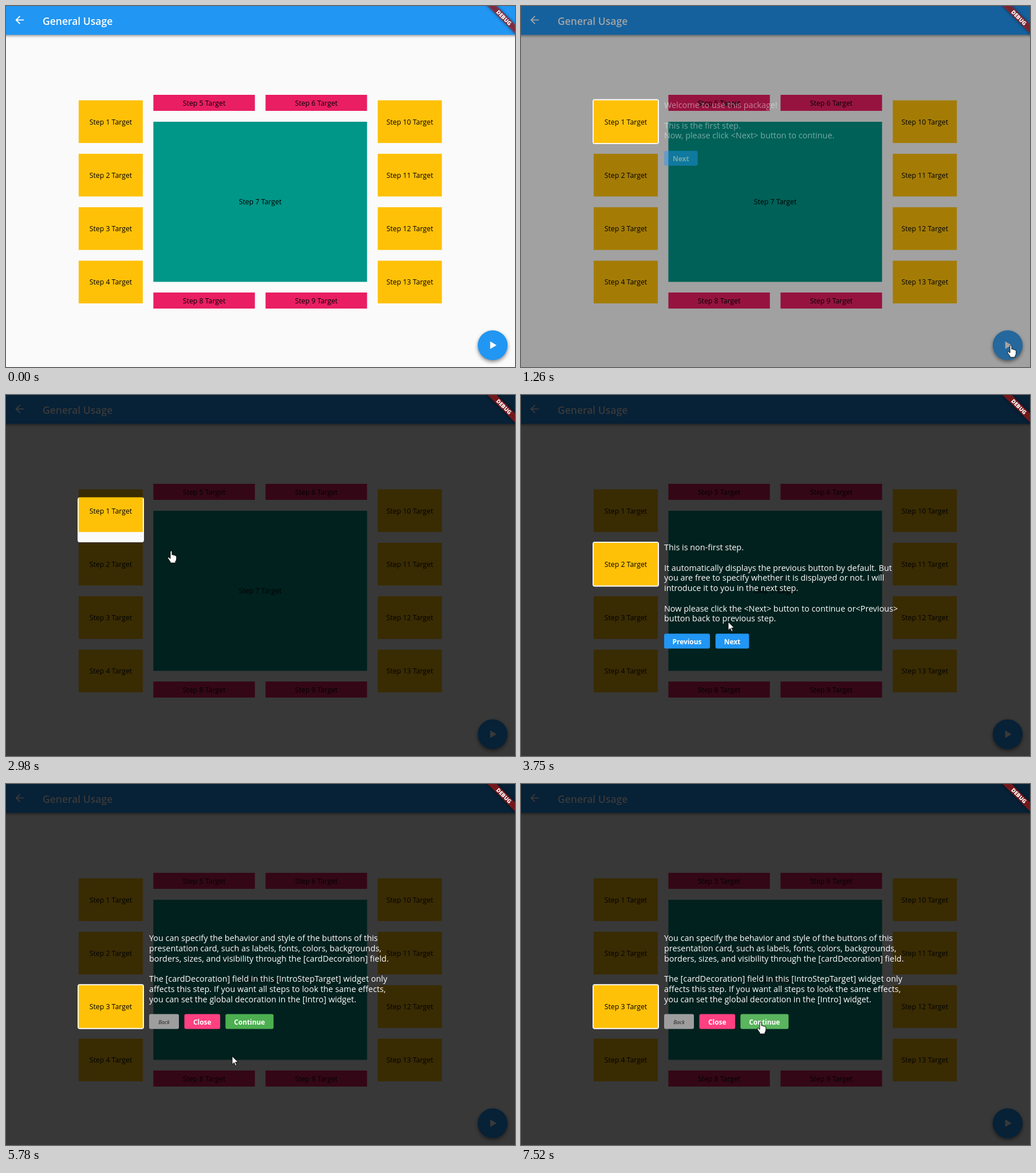
Recreate the animation shown at these times as an HTML page. Size 889 by 630 pixels, loop 8 s.

```html
<!DOCTYPE html>
<html lang="en">
<head>
<meta charset="utf-8">
<title>General Usage</title>
<style>
  html, body { margin: 0; width: 100%; height: 100%; overflow: hidden; background: #fafafa; }
  svg { display: block; width: 889px; height: 630px; font: 12.3px "Open Sans", "Noto Sans", sans-serif; }
  .middle { text-anchor: middle; }
  .title { font-size: 17.5px; font-weight: 600; fill: #fff; }
  .card { font-size: 14.4px; fill: #fff; white-space: pre; }
  .label { font-size: 11.9px; font-weight: 700; fill: #fff; text-anchor: middle; }
  .back { font-size: 9.3px; font-weight: 400; font-style: italic; fill: #222; }
  .debug { font-size: 9.6px; font-weight: 800; fill: #fff; text-anchor: middle; }
  .bar { filter: drop-shadow(0 2px 2px #0006); }
  .fab { filter: drop-shadow(0 3px 3px #0007); }
  .blur { filter: blur(2.5px); }
</style>
</head>
<body>
<svg viewBox="0 0 889 630">
  <rect width="889" height="630" fill="#fafafa"/>
  <rect class="bar" x="-9" y="-20" width="907" height="70.3" fill="#2196f3"/>
  <path transform="translate(12.6 13.2) scale(.933)" fill="#fff"
    d="M20 11H7.83l5.59-5.59L12 4l-8 8 8 8 1.41-1.41L7.83 13H20v-2z"/>
  <text class="title" x="64" y="32.7">General Usage</text>
  <g id="targets"></g>
  <circle class="fab" cx="850" cy="592" r="26.1" fill="#2196f3"/>
  <circle id="fabGlow" cx="850" cy="592" r="26.1" fill="#fff"/>
  <path d="M845.7 585.2V598.6L856.8 591.9Z" fill="#fff"/>
  <path id="mask" fill-rule="evenodd"/>
  <g id="cards"></g>
  <g transform="translate(892 -2) rotate(45)">
    <rect class="blur" x="-60" y="26.1" width="120" height="11.2" opacity=".5"/>
    <rect x="-60" y="26.1" width="120" height="11.2" fill="#b71c1c" fill-opacity=".627"/>
    <text class="debug" y="35.2">DEBUG</text>
  </g>
  <g id="cursor" fill="#fff" stroke="#000" stroke-width=".9">
    <path id="arrow" d="M0 0V14.5L3.4 11.3L5.8 16.7L8 15.7L5.6 10.5H10.3Z"/>
    <path id="hand" d="M-1.5 2Q-1.5 0 0 0T1.5 2V7Q3 6 4.3 7.6Q6 6.8 7 8.4Q9 8 9.3 10V14Q9 17 7.5 18.5V21H-1.5V19Q-4 16 -5.8 12.5Q-6 10.3 -4.6 10.8L-1.5 13.5Z"/>
  </g>
</svg>
<script>
const $ = id => document.getElementById(id);
const clamp = v => Math.max(0, Math.min(1, v));
const ramp = (t, from, to) => clamp((t - from) / (to - from));
const smooth = v => v * v * (3 - 2 * v);
const escapeText = s => s.replace(/</g, '&lt;');

const AMBER = '#ffc107', PINK = '#e91e63', BLUE = '#2196f3';
const ROW = 93.3, LINE = 17.75, LOOP = 8000;

// Target boxes
const target = (n, x, y, w, h, color) =>
  `<rect x="${x}" y="${y}" width="${w}" height="${h}" fill="${color}"/>
   <text class="middle" x="${x + w / 2}" y="${y + h / 2 + 4.7}">Step ${n} Target</text>`;
let boxes = target(7, 257.4, 202, 373.2, 279.4, '#009688');
for (let i = 0; i < 4; i++) {
  boxes += target(i + 1, 126.9, 164.6 + ROW * i, 112, 74.5, AMBER);
  boxes += target(i + 10, 649.3, 164.6 + ROW * i, 112, 74.5, AMBER);
  boxes += target([5, 6, 8, 9][i], i % 2 ? 453.3 : 257.4, i < 2 ? 155 : 500, 177.3, 28, PINK);
}
$('targets').innerHTML = boxes;

// Cards: visible from "show" (fading until "full") to "hide"; hit-tested until "stale"
const button = (text, x, w, color = BLUE, style = '') => ({ text, x, w, color, style });
const cards = [
  { show: 1130, full: 1415, hide: 2910, stale: 3350, click: 2790, y: 178, buttonY: 252.8,
    lines: ['Welcome to use this package!', '', 'This is the first step.',
      'Now, please click <Next> button to continue.'],
    buttons: [button('Next', 250, 58.6)] },
  { show: 3290, full: 3540, hide: 4890, stale: 5250, click: 4750, y: 271, buttonY: 416.4,
    lines: ['This is non-first step.', '',
      'It automatically displays the previous button by default. But',
      'you are free to specify whether it is displayed or not. I will',
      'introduce it to you in the next step.', '',
      'Now please click the <Next> button to continue or<Previous>',
      'button back to previous step.'],
    buttons: [button('Previous', 250, 80), button('Next', 339.7, 58.6)] },
  { show: 5250, full: 5510, hide: LOOP, stale: LOOP, click: LOOP, y: 274, buttonY: 401.4,
    lines: ['You can specify the behavior and style of the buttons of this',
      'presentation card, such as labels, fonts, colors, backgrounds,',
      'borders, sizes, and visibility through the [cardDecoration] field.', '',
      'The [cardDecoration] field in this [IntroStepTarget] widget only',
      'affects this step. If you want all steps to look the same effects,',
      'you can set the global decoration in the [Intro] widget.'],
    buttons: [button('Back', 250, 52, '#9e9e9e', 'back'), button('Close', 311.5, 62.6, '#ff4081'),
      button('Continue', 383.3, 84, '#4caf50')] }
];
$('cards').innerHTML = cards.map(c => '<g>' +
  c.lines.map((s, i) => `<text class="card" x="250" y="${c.y + LINE * i}">${escapeText(s)}</text>`).join('') +
  c.buttons.map(b => {
    const box = `x="${b.x}" y="${c.buttonY}" width="${b.w}" height="26" rx="3"`;
    return `<rect ${box} fill="${b.color}"/><rect class="glow" ${box} fill="#fff"/>
      <text class="label ${b.style}" x="${b.x + b.w / 2}" y="${c.buttonY + (b.style ? 17.3 : 18.4)}">${b.text}</text>`;
  }).join('') + '</g>').join('');
cards.forEach((c, i) => {
  c.node = $('cards').children[i];
  c.glows = c.node.querySelectorAll('.glow');
});

// Pointer path: time, x, y
const path = [
  [440, 848, 630], [730, 855.5, 592], [1570, 855.5, 592], [2100, 366, 332], [2250, 366, 332],
  [2640, 288.5, 272], [3400, 288.5, 272], [3750, 362, 396], [3890, 359, 419], [4160, 358, 424],
  [5530, 358, 424], [5780, 395, 475], [5880, 395, 475], [6160, 412, 420], [6680, 262, 417],
  [6830, 254.5, 416], [6960, 256, 416], [7520, 418.5, 415], [LOOP, 418.5, 415]
];
function pointer(t) {
  const i = Math.max(1, path.findIndex(p => p[0] > t));
  const [t0, x0, y0] = path[i - 1], [t1, x1, y1] = path[i];
  const k = smooth(ramp(t, t0, t1));
  return [x0 + (x1 - x0) * k, y0 + (y1 - y0) * k];
}

// Brief press highlight after a click
const press = (t, at) => t < at ? 0 : .2 * ramp(t, at, at + 100) * (1 - ramp(t, at + 150, at + 350));

function render(t) {
  const [x, y] = pointer(t);
  const active = cards.find(c => t < c.stale);
  const overFab = t < 2000 && Math.hypot(x - 850, y - 592) < 26;
  let hand = overFab;

  for (const c of cards) {
    c.node.setAttribute('opacity', t < c.hide ? ramp(t, c.show, c.full) : 0);
    c.buttons.forEach((b, i) => {
      const over = c === active && t >= c.show && x > b.x && x < b.x + b.w && y > c.buttonY && y < c.buttonY + 26;
      hand = hand || over;
      c.glows[i].setAttribute('opacity', over ? .08 + press(t, c.click) : 0);
    });
  }
  $('fabGlow').setAttribute('opacity', overFab ? .08 * (1 - ramp(t, 1130, 1400)) + press(t, 980) : 0);

  const top = 162.6 + ROW * (ramp(t, 2917, 3290) + ramp(t, 4885, 5250));
  $('mask').setAttribute('d', `M0 0H889V630H0Z M129 ${top}h108q4 0 4 4v70.5q0 4 -4 4h-108q-4 0 -4 -4v-70.5q0 -4 4 -4Z`);
  $('mask').setAttribute('opacity', .776 * ramp(t, 1130, 1415));
  $('mask').style.display = t < 1130 ? 'none' : '';

  $('cursor').setAttribute('transform', `translate(${x} ${y})`);
  $('cursor').style.display = t < 470 ? 'none' : '';
  $('hand').style.display = hand ? '' : 'none';
  $('arrow').style.display = hand ? 'none' : '';
}

const start = performance.now();
(function tick() {
  render((performance.now() - start) % LOOP);
  requestAnimationFrame(tick);
})();
</script>
</body>
</html>
```
